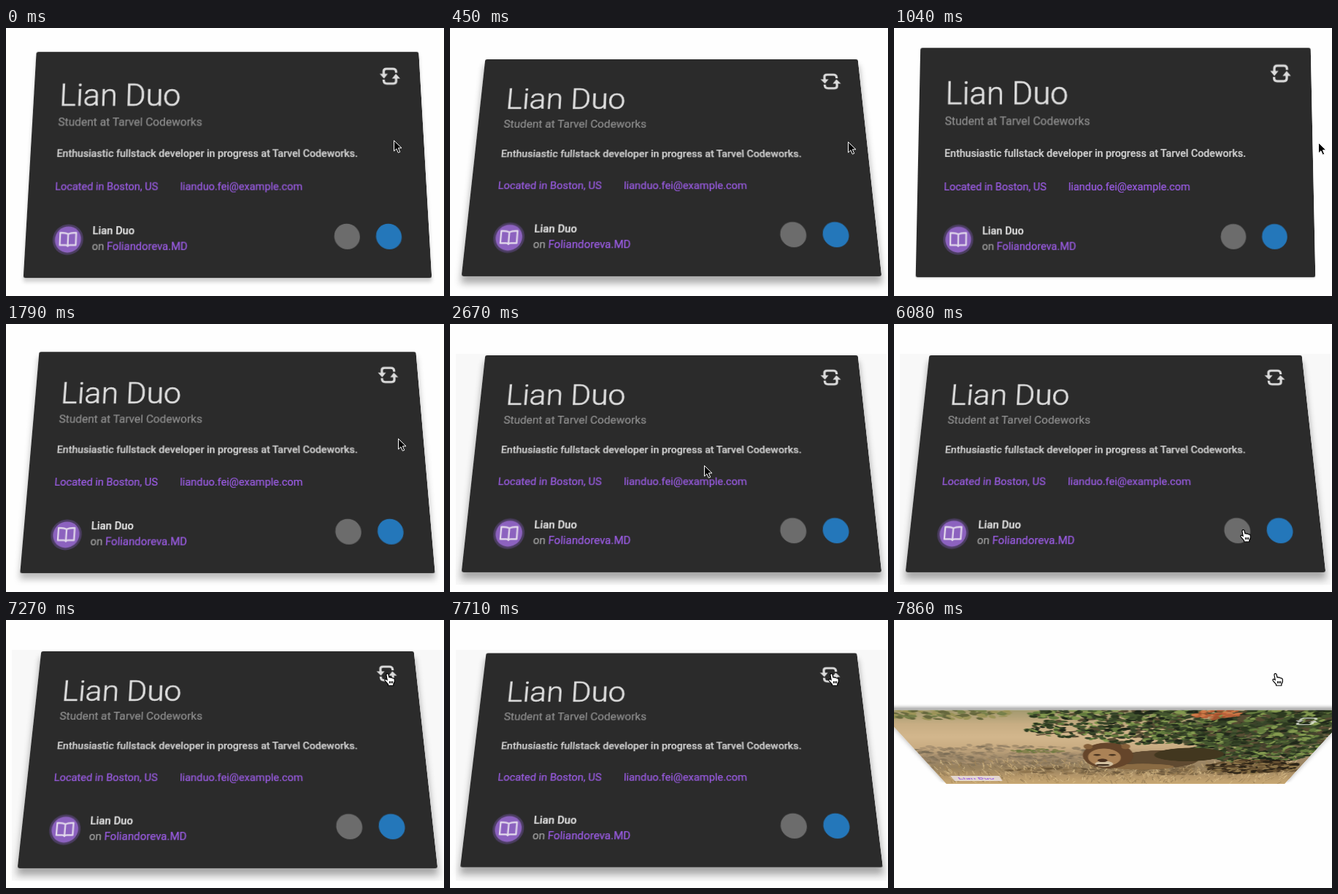
An HTML page with a canvas for the animation above (8000 ms loop, 600 px wide and 368 px high).

```html
<!DOCTYPE html>
<html lang="en">
<head>
<meta charset="utf-8">
<title>Flip card</title>
<style>
  html, body { margin: 0; width: 100%; height: 100%; overflow: hidden; background: #fefefe; }
  #stage { position: absolute; left: 0; top: 0; width: 600px; height: 368px; overflow: hidden; }
  #halo { position: absolute; left: 8px; top: 41px; width: 590px; height: 317px; background: #f8f8f8; }
  #scene { position: absolute; left: 33px; top: 25px; width: 540.5px; height: 315.6px; perspective: 900px; }
  #card { position: absolute; inset: 0; transform-style: preserve-3d; }
  #shadow, .face { position: absolute; inset: 0; border-radius: 3px; }
  .face { overflow: hidden; backface-visibility: hidden; background: #2b2b2b; }
  .face svg, .face canvas { position: absolute; left: 0; top: 0; }
  #back { transform: rotateX(180deg); background: #b8976a; }
  text { font-family: Roboto, sans-serif; font-size: 14.4px; fill: #9b5ce4; stroke: #9b5ce4; stroke-width: .25px; }
  .title { font-size: 44px; font-weight: 300; fill: #e0e0e0; stroke: #e0e0e0; stroke-width: .6px; }
  .role { font-size: 15.7px; fill: #8e8e8e; stroke: #8e8e8e; }
  .about { font-size: 14.2px; font-weight: 500; fill: #d0d0d0; stroke: #d0d0d0; }
  .name { font-weight: 500; fill: #e6e6e6; stroke: #e6e6e6; }
  .muted { fill: #a0a0a0; stroke: #a0a0a0; }
  #cursor { position: absolute; left: 0; top: 0; overflow: visible; }
</style>
</head>
<body>
<div id="stage">
  <div id="halo"></div>
  <div id="scene">
    <div id="card">
      <div id="shadow"></div>
      <div class="face" id="front">
        <svg width="541" height="316">
          <defs>
            <g id="flip">
              <g id="half">
                <path d="M-8.5-2V-6.5Q-8.5-10.8-4.2-10.8H4.7Q9-10.8 9-6.5V-5" fill="none" stroke="currentColor" stroke-width="3.3"/>
                <path d="M-14.2-3.5H-2.800L-8.5 3.5Z" fill="currentColor"/>
              </g>
              <use href="#half" transform="rotate(180)"/>
            </g>
          </defs>
          <text class="title" x="36" y="79.300">Lian Duo</text>
          <text class="role" x="35.700" y="107.7">Student at Tarvel Codeworks</text>
          <text class="about" x="36" y="152.5">Enthusiastic fullstack developer in progress at Tarvel Codeworks.</text>
          <text x="36" y="198">Located in Boston, US</text>
          <text x="206" y="198">lianduo.fei@example.com</text>
          <text class="name" x="89.300" y="258.5">Lian Duo</text>
          <text x="89.300" y="279"><tspan class="muted">on</tspan> Foliandoreva.MD</text>
          <g transform="translate(56.8 264.9)">
            <circle r="20.5" fill="#4b3d61"/>
            <circle r="17.5" fill="#8c62bf"/>
            <path d="M0-7Q-3-9-10.700-9V7.500H-3Q-.5 7.500 0 9Q.5 7.500 3 7.500H10.700V-9Q3-9 0-7V8" fill="none" stroke="#e2d9ec" stroke-width="2.200" stroke-linejoin="round"/>
          </g>
          <circle cx="430.7" cy="260.900" r="17.2" fill="#6c6c6c"/>
          <circle cx="486.7" cy="260.900" r="17.2" fill="#2477ba"/>
          <use href="#flip" x="498.6" y="36" color="#dcdcdc"/>
        </svg>
      </div>
      <div class="face" id="back">
        <canvas id="photo" width="541" height="316"></canvas>
        <svg width="541" height="316">
          <rect x="17.500" y="271" width="75" height="26" fill="#efe6ea" fill-opacity=".8"/>
          <text x="26" y="289">Lian Duo</text>
          <use href="#flip" x="498.6" y="36" color="#eef0e8" opacity=".75"/>
        </svg>
      </div>
    </div>
  </div>
  <svg id="cursor" width="16" height="18">
    <path id="arrow" d="M.5.5V15L3.900 11.800 6.300 17.200 8.700 16.200 6.400 10.800H11Z" fill="#000" stroke="#fff"/>
    <path id="hand" d="M4.200 9.500L3 3Q2.600 1 4.200.7T6 2L7 6Q8.300 4.800 9.300 6.300Q10.700 5.300 11.700 7Q14 6.500 14.300 9V11.500Q13.800 13.500 12.800 14.800V17H5.500V15.300L1.300 10.600Q.3 8.600 1.800 8.200Q3 8 4.200 9.500ZM7.500 11V14M9.500 11V14M11.500 11V14" fill="#fff" stroke="#000" stroke-width="1.200" stroke-linejoin="round"/>
  </svg>
</div>
<script>
const LOOP = 8000;
const STEP = LOOP / 54;
const TURN = 500;            // duration of one card rotation
const $ = id => document.getElementById(id);

// [start ms, from degrees, to degrees]
const turns = [[-158, 0, 20], [787, 20, 0], [1528, 0, 20], [7692, 20, 180]];

// [step, x, y]
const path = [
  [0, 531, 154], [3, 545, 156], [4, 545, 156], [5, 566, 157], [6, 578, 157], [7, 581, 157],
  [9, 581, 157], [11, 558, 157], [12, 537, 157], [15, 440, 178], [19, 317, 199], [23, 317, 214],
  [24, 317, 214], [25, 316, 214], [26, 316, 214], [27, 275, 238], [28, 229, 266], [29, 224, 285],
  [30, 222, 297], [31, 222, 297], [35, 330, 298], [39, 464, 283], [41, 474, 282], [43, 520, 283],
  [44, 520, 283], [45, 527, 262], [46, 535, 170], [47, 535, 85], [48, 529, 66], [49, 518, 73], [54, 518, 73]
];

// left, top, right, bottom of the clickable areas
const links = [[235, 206, 410, 228], [130, 282, 248, 310], [452, 266, 548, 304], [505, 60, 542, 90]];

// cubic-bezier(.25, .1, .25, 1)
function ease(x) {
  if (x >= 1) return 1;
  const bez = (a, b, s) => 3 * a * s * (1 - s) ** 2 + 3 * b * s * s * (1 - s) + s ** 3;
  let lo = 0, hi = 1;
  for (let i = 0; i < 24; i++) {
    const mid = (lo + hi) / 2;
    if (bez(.25, .25, mid) < x) lo = mid; else hi = mid;
  }
  return bez(.1, 1, lo);
}

function cardAngle(t) {
  const [start, from, to] = turns.filter(turn => turn[0] <= t).pop();
  return from + (to - from) * ease((t - start) / TURN);
}

function cursorAt(step) {
  const i = path.findIndex(p => p[0] > step);
  const a = path[i - 1], b = path[i];
  const f = (step - a[0]) / (b[0] - a[0]);
  return [a[1] + (b[1] - a[1]) * f, a[2] + (b[2] - a[2]) * f];
}

function paintPhoto() {
  const g = $('photo').getContext('2d');
  let seed = 11;
  const rnd = () => (seed = seed * 16807 % 2147483647) / 2147483647;
  const pick = list => list[Math.floor(rnd() * list.length)];
  const blob = (x, y, rx, ry, color, tilt = 0) => {
    g.fillStyle = color;
    g.beginPath();
    g.ellipse(x, y, rx, ry, tilt, 0, 7);
    g.fill();
  };
  const scatter = (x, y, rx, ry, count, colors, size) => {
    for (let i = 0; i < count; i++) {
      const a = rnd() * 6.283, r = Math.sqrt(rnd());
      blob(x + Math.cos(a) * r * rx, y + Math.sin(a) * r * ry,
        size * (.5 + rnd()), size * (.6 + rnd()), pick(colors), rnd() * 3);
    }
  };

  const ground = g.createLinearGradient(0, 0, 0, 316);
  ['#a39a70', '#c8ae84', '#d3b78d', '#c9ac82', '#a08a6a', '#97815f', '#b5976a', '#c9a974']
    .forEach((c, i) => ground.addColorStop(i / 7, c));
  g.fillStyle = ground;
  g.fillRect(0, 0, 541, 316);

  scatter(60, 12, 95, 18, 120, ['#77804a', '#9c9459', '#67683e'], 4);
  scatter(110, 168, 150, 48, 420, ['#85735990', '#75685490', '#b3997490', '#95826690'], 4);
  scatter(165, 148, 35, 8, 40, ['#6f7a42', '#87834f'], 3);
  scatter(330, 240, 220, 24, 240, ['#75603f90', '#8d734c90', '#5c4a3290'], 5);

  // dry grass
  for (let i = 0; i < 700; i++) {
    const x = rnd() * 540, y = 195 + rnd() * 120;
    g.strokeStyle = pick(['#e2c995', '#d3b57e', '#86704c', '#a58858']);
    g.beginPath();
    g.moveTo(x, y);
    g.lineTo(x + rnd() * 10 - 5, y - 8 - rnd() * 14);
    g.stroke();
  }

  // tree: shaded mass first, then fine leaves
  const greens = ['#2d3a20', '#44562f', '#647c3e', '#20281a', '#83994f', '#38452a', '#574c34'];
  g.strokeStyle = '#4b3d2a';
  g.lineWidth = 3;
  g.beginPath();
  g.moveTo(420, 60);
  g.quadraticCurveTo(290, 45, 170, 85);
  g.stroke();
  scatter(440, 95, 85, 85, 120, ['#2b3320b0', '#3b4329b0', '#4a4430b0'], 13);
  scatter(275, 14, 105, 22, 260, greens, 4);
  scatter(205, 62, 48, 30, 100, greens, 3.5);
  scatter(300, 72, 75, 48, 260, greens, 4);
  scatter(365, 60, 58, 62, 340, greens, 4);
  scatter(470, 95, 95, 110, 1100, greens, 4.5);
  scatter(500, 20, 60, 35, 220, greens, 4.5);
  scatter(470, 222, 65, 34, 260, ['#2c2417', '#4b3a24', '#6d5635', '#8a7348'], 5);
  scatter(388, 14, 26, 15, 60, ['#b8613a', '#cf7a48', '#a0522f'], 3.5);

  // resting lion
  blob(330, 188, 58, 42, '#5f4a31');
  blob(372, 165, 48, 30, '#42371f');
  blob(310, 222, 46, 15, '#8a6b43');
  blob(260, 172, 35, 58, '#65452a');
  blob(255, 178, 23, 40, '#ab8256');
  blob(234, 130, 6, 11, '#85603a');
  blob(284, 130, 6, 11, '#85603a');
  blob(245, 166, 5, 4, '#4a3521');
  blob(266, 166, 5, 4, '#4a3521');
  blob(254, 208, 13, 14, '#d3c0a0');
  blob(252, 191, 7, 8, '#4a3020');
  blob(252, 213, 10, 5, '#3c2a1c');
}

function draw() {
  const now = performance.now() % LOOP;
  const step = Math.min(53, Math.floor((now + 3) / STEP));
  const angle = cardAngle(step * STEP);
  const lift = Math.min(1, angle / 20);
  $('card').style.transform = `rotateX(${angle}deg)`;
  $('shadow').style.boxShadow = `0 ${9 * lift}px ${10 * lift}px rgba(0,0,0,${.33 * lift})`;
  $('halo').style.opacity = angle > 19 && angle < 25 && step > 12 ? 1 : 0;

  const [x, y] = cursorAt(step);
  const onLink = links.some(([l, t, r, b]) => x >= l && x <= r && y >= t && y <= b);
  $('cursor').style.transform = `translate(${Math.round(x)}px, ${Math.round(y)}px)`;
  $('arrow').style.display = onLink ? 'none' : '';
  $('hand').style.display = onLink ? '' : 'none';
  requestAnimationFrame(draw);
}

paintPhoto();
draw();
</script>
</body>
</html>
```
